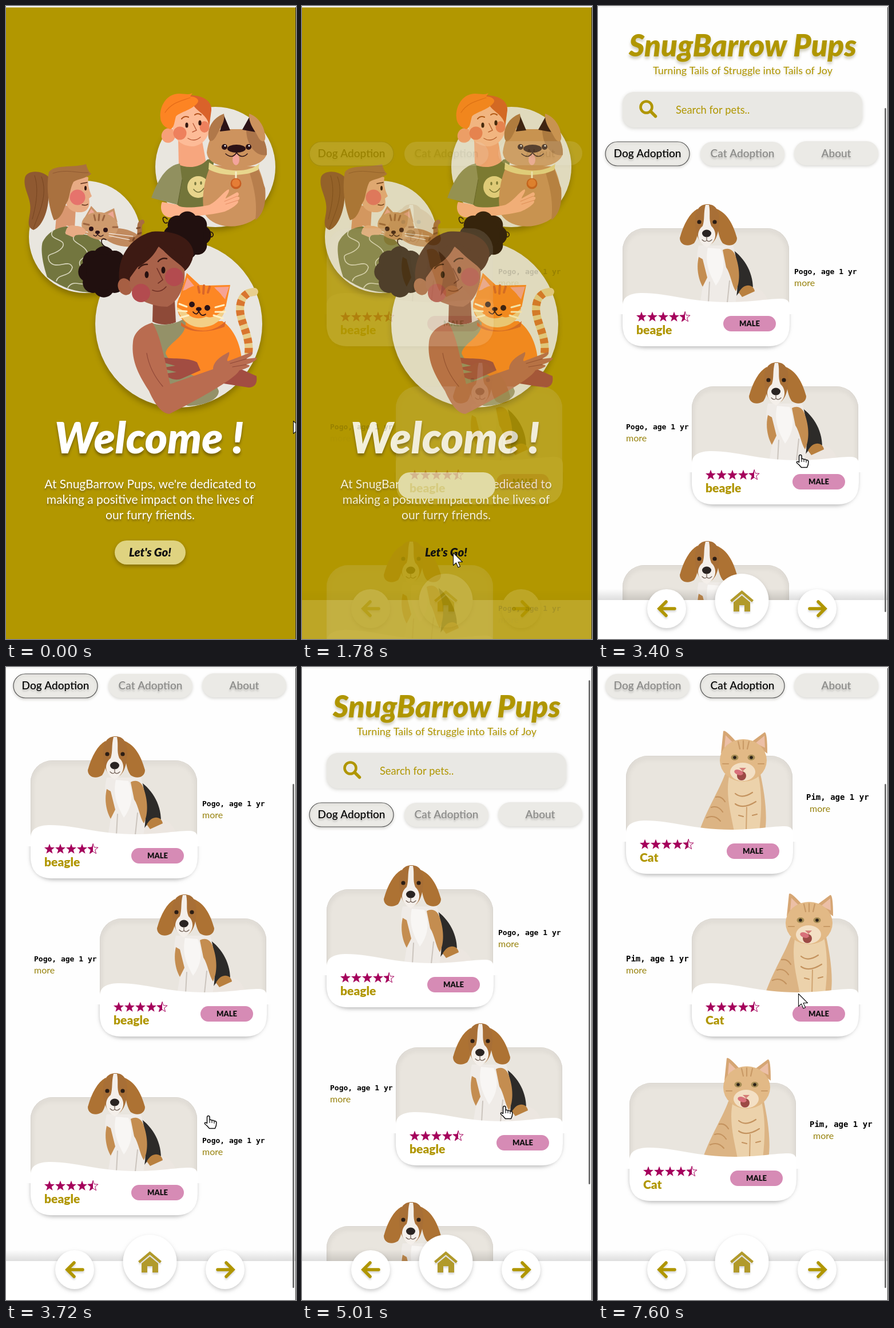
Animation of 507x1105 px, one loop 8000 ms. Source, as an HTML page with a canvas:

```html
<!DOCTYPE html>
<html lang="en">
<head>
<meta charset="utf-8">
<title>Pet adoption app</title>
<style>
html, body { margin: 0; width: 100%; height: 100%; overflow: hidden; background: #b29700; }
canvas { display: block; width: 507px; height: 1105px; }
</style>
</head>
<body>
<canvas id="stage"></canvas>
<script>
const W = 507, H = 1105, LOOP = 8000;
const OLIVE = '#b09600', BRAND = 'SnugBarrow Pups';
const dpr = window.devicePixelRatio || 1;

function setup(canvas) {
  canvas.width = W * dpr;
  canvas.height = H * dpr;
  const ctx = canvas.getContext('2d');
  ctx.scale(dpr, dpr);
  ctx.lineCap = 'round';
  return ctx;
}
let c = setup(document.getElementById('stage'));
const spare = setup(document.createElement('canvas'));

// ---- helpers ----
const lato = (size, style = '') => `${style} ${size}px Lato, "Open Sans", sans-serif`;
const brush = size => lato(size, 'italic 900');

function shadow(color = 'transparent', blur = 0, dy = 0) {
  c.shadowColor = color; c.shadowBlur = blur * dpr; c.shadowOffsetY = dy * dpr;
}
function path(d, fill, stroke, width = 1) {
  const p = new Path2D(d);
  if (fill) { c.fillStyle = fill; c.fill(p); }
  if (stroke) { c.strokeStyle = stroke; c.lineWidth = width; c.stroke(p); }
}
const line = (d, color, width = 1) => path(d, null, color, width);
function oval(x, y, rx, ry, fill, turn = 0) {
  c.beginPath(); c.ellipse(x, y, rx, ry, turn, 0, 7);
  c.fillStyle = fill; c.fill();
}
const disc = (x, y, r, fill) => oval(x, y, r, r, fill);
function box(x, y, w, h, r, fill, stroke) {
  c.beginPath(); c.roundRect(x, y, w, h, r);
  if (fill) { c.fillStyle = fill; c.fill(); }
  if (stroke) { c.strokeStyle = stroke; c.lineWidth = 1.2; c.stroke(); }
}
function text(s, x, y, font, fill, align = 'left') {
  c.font = font; c.fillStyle = fill; c.textAlign = align;
  c.fillText(s, x, y);
}
// Draws a group apart, then lays it down at one opacity.
function layer(alpha, draw) {
  const main = c;
  c = spare;
  c.clearRect(0, 0, W, H);
  draw();
  c = main;
  c.save();
  c.globalAlpha = alpha;
  c.drawImage(spare.canvas, 0, 0, W, H);
  c.restore();
}

// ---- welcome screen ----
function backCircle(x, y, r) {
  shadow('rgba(70,55,0,.4)', 10, 6);
  disc(x, y, r, '#e9e6df');
  shadow();
}

function boyAndDog() {
  backCircle(366, 281, 105);
  path('M322 156C345 156 360 166 359 182L355 212L330 190Z', '#d9622a');
  path('M301 232L343 236L350 274C335 288 312 284 302 277Z', '#f7a67e');
  oval(284, 226, 12, 13, '#f7a078', .5);
  path('M291 208C291 186 314 182 328 174C334 184 352 190 355 208C358 232 338 246 324 245C304 243 292 232 291 208Z', '#fdbb97');
  disc(304, 222, 11.5, '#ee805d');
  oval(347, 211, 8.5, 10, '#ee805d');
  path('M270 195C268 178 278 158 295 154C308 151 316 157 326 152L322 158C332 158 340 164 334 170C324 182 302 186 297 193C294 204 294 213 287 215C276 212 270 203 270 195Z', '#fd8423');
  line('M278 186C290 168 306 166 322 160', '#e56c18', 1.2);
  line('M307 197Q312 191 319 194M330 190Q335 186 341 190', '#b4531e', 2.2);
  oval(316, 208, 2.6, 4.6, '#33170f'); oval(339, 204, 2.6, 4.6, '#33170f');
  line('M327 205L333 217L326 220M318 231Q329 238 340 229', '#b85a38', 1.4);

  path('M300 276C318 285 340 282 352 268L364 266L352 362L298 352Z', '#73753a');
  path('M304 275C284 278 268 296 254 335L300 347L308 305Z', '#91905f');
  line('M308 303L300 347', '#5d5f2d');
  disc(336, 316, 19, '#e8d58c');
  line('M328 320Q337 331 346 318', '#77753d', 1.6);
  oval(331, 310, 1.7, 3, '#77753d'); oval(341, 309, 1.7, 3, '#77753d');

  path('M358 278C344 308 341 345 348 364C366 392 420 392 446 362C458 338 452 304 440 280Z', '#cd935e');
  path('M425 288C433 315 440 340 436 374C452 362 455 340 453 318L440 282Z', '#b77e4c');
  path('M351 256C353 236 362 216 378 215L430 215C444 218 457 240 456 258C450 277 425 281 405 281C380 281 354 278 351 256Z', '#cd935e');
  path('M420 215L430 215C446 218 457 240 456 260C440 264 420 246 420 215Z', '#ac754a');
  path('M381 191L392 217L374 219ZM427 191L413 216L436 220Z', '#2b1216');
  path('M354 230C352 212 362 195 381 188C384 201 375 212 368 226C363 236 356 240 354 230Z', '#b07849');
  path('M425 188C441 193 452 210 453 226C455 239 446 240 440 227C434 215 424 206 425 188Z', '#cd935e');
  path('M355 273C380 291 425 292 443 275L441 286C420 298 376 298 354 285Z', '#e8d68d');
  line('M402 290L402 303', '#f6edc8', 3);
  disc(402, 310, 9.5, '#c85d22'); disc(402, 309, 7, '#e57d36');
  oval(402, 268, 6, 10, '#f3a49c');
  line('M384 258Q396 268 403 256Q412 268 422 258', '#2b1216', 1.6);
  oval(403, 249, 16, 7, '#2b1216');
  for (const x of [382, 424]) { disc(x, 246, 5, '#2b1216'); disc(x + 1, 244, 1.5, '#fff'); }

  path('M273 342L300 347C302 354 340 352 356 347C370 340 380 324 389 320C393 322 384 333 384 336L404 325C409 327 407 331 404 333C411 332 408 338 405 340C410 343 395 354 382 359C360 365 320 368 285 369C270 366 269 350 273 342Z', '#fdb38c');
  line('M384 346L406 339M382 341L404 332', '#e68d65');
}

function girlAndKitten() {
  backCircle(138, 403, 98);
  path('M74 298C62 286 36 286 33 300C29 320 46 336 42 360C40 375 36 386 48 391C65 385 77 350 74 322Z', '#8f5931');
  line('M62 298C74 330 58 360 48 388M50 296C58 320 52 350 46 372', '#774521');
  path('M90 345L122 352L120 388L86 390Z', '#d99770');
  path('M116 305C128 300 140 297 144 299C142 314 147 325 150 332L145 336C148 350 142 361 128 360C112 360 104 350 104 335Z', '#e8ab84');
  path('M75 290C85 276 115 283 140 276C142 284 145 290 149 293C140 301 125 302 118 307C112 318 112 330 108 340C101 350 100 370 84 374C74 350 70 315 75 290Z', '#a9713f');
  line('M82 292C105 284 125 292 144 291', '#8f5931');
  disc(125, 334, 13.5, '#e6736c');
  oval(139, 318, 2, 4, '#33170f');
  line('M131 310L142 308M133 347Q140 349 143 346', '#5c2d18', 1.5);
  oval(203, 404, 34, 15, '#c18a5e', .2);
  line('M218 408C245 408 226 382 238 377', '#a86d42', 8);
  line('M222 409L224 405M231 398L236 396M229 388L234 387', '#7d4b2b', 3);
  path('M64 412C75 390 100 381 122 386C150 396 172 410 173 430C170 470 164 490 145 500C115 498 96 490 72 473C64 450 60 425 64 412Z', '#73763f');
  line('M82 392C70 410 110 405 98 422C84 438 68 428 76 446C88 462 110 440 116 456C112 474 92 466 88 480M122 398C108 412 132 414 140 426C150 440 122 438 130 454C142 466 156 450 160 464M108 492C118 474 136 494 146 480', '#d8d6bd', 1.6);
  path('M136 372L149 349L163 364ZM170 362L189 353L195 378Z', '#c99367');
  path('M141 368L149 354L158 364ZM176 364L187 358L190 374Z', '#eda796');
  oval(164, 384, 32, 24, '#ce9a6d', .15);
  line('M163 364L162 374M154 365L156 374M172 366L169 374M136 380L145 382M187 386L195 386', '#9c6540', 3);
  disc(149, 389, 4, '#2b1216'); disc(174, 391, 4, '#2b1216');
  oval(160, 395, 4, 3, '#2b1216');
  line('M153 400Q158 404 160 398Q164 405 170 400', '#2b1216', 1.3);
  line('M143 395L106 384M142 399L104 395M180 401L216 408M180 397L222 402', '#fff', 1.1);
  path('M104 398C104 386 112 380 122 384C134 384 144 392 138 398C134 402 122 396 118 404Z', '#e8ab84');
}

function puff(x, y, r) {
  for (let i = 0; i < 8; i++) {
    const a = i * Math.PI / 4;
    disc(x + Math.cos(a) * r * .62, y + Math.sin(a) * r * .62, r * .42, '#21100f');
  }
  disc(x, y, r * .72, '#21100f');
}

function girlAndCat() {
  backCircle(302, 555, 146);
  puff(171, 464, 43); puff(317, 400, 40);
  line('M282 372C270 360 274 384 282 378M350 396C365 388 366 408 354 402M176 422C162 414 166 402 175 408', '#21100f', 1.6);
  path('M198 480C194 440 215 405 255 394C290 391 325 402 328 432C326 448 318 460 310 464L220 486Z', '#3d1a13');
  path('M257 512L295 514L297 552C284 558 268 557 256 551Z', '#8e4a38');
  oval(208, 490, 12, 15, '#a75f43', -.4);
  path('M217 462C236 452 258 432 267 420C282 434 304 442 311 454C317 482 304 515 282 525C255 525 222 512 216 488Z', '#a9624a');
  disc(236, 501, 16, '#b34b4f'); disc(294, 473, 16, '#b34b4f');
  path('M214 478C214 446 240 420 268 414C264 432 246 448 230 456Z', '#3d1a13');
  path('M264 412C290 420 318 436 312 460C304 448 282 440 264 412Z', '#3d1a13');
  line('M232 458Q238 450 247 451M266 446Q272 439 281 441', '#3d1a13', 2.5);
  oval(246, 469, 3.5, 6, '#25100f'); oval(275, 461, 3.5, 6, '#25100f');
  line('M264 458L274 478L266 484M256 496Q270 502 280 490', '#6f3025', 1.6);

  path('M254 553C270 560 298 556 314 544L372 672C372 688 345 698 318 698L268 680Z', '#949168');
  line('M424 606C428 570 402 545 411 516C416 500 428 500 434 499', '#e8cf8e', 14);
  c.save();
  c.lineCap = 'butt'; c.setLineDash([9, 8]);
  line('M424 606C428 570 402 545 411 516C414 508 418 505 422 502', '#d9752f', 14);
  c.restore();
  path('M314 552C316 578 282 588 279 606C284 622 310 640 340 650L412 628C414 596 398 562 378 550Z', '#fd8724');
  path('M306 552C330 572 362 572 384 550L382 560C356 570 325 572 306 558Z', '#d9662a');
  path('M304 506L316 466L344 492ZM350 488L392 487L384 526Z', '#fd8724');
  path('M309 497L317 474L331 491ZM364 491L390 490L383 512Z', '#f6a394');
  oval(341, 524, 42, 37, '#fd8724');
  path('M299 526C304 546 320 561 341 561C365 560 379 548 383 528C368 542 358 546 350 542C338 548 324 546 314 534Z', '#f3cf86');
  line('M303 520L316 525M301 532L316 533M304 544L319 540M381 522L366 526M383 534L366 534M379 545L363 540', '#fff0c4', 3);
  line('M346 488L345 502M336 490L338 500M356 490L353 500', '#d9662a', 4);
  disc(325, 521, 5, '#2b1216'); disc(352, 527, 5, '#2b1216');
  oval(337, 529, 5, 3.5, '#2b1216');
  line('M327 534Q334 542 337 532Q341 544 349 538', '#2b1216', 1.8);

  path('M268 612C290 618 316 612 334 622L340 636L308 650C295 656 280 648 278 642L298 639L270 632L296 628L266 620Z', '#a24d42');
  path('M374 638L402 630L438 646C440 660 434 666 424 666L374 658Z', '#a24d42');
  path('M222 586C224 568 240 557 256 553C270 574 278 620 287 660L362 634C362 618 382 608 390 604C392 610 384 618 388 620L430 604C434 608 424 613 420 616L438 614C440 619 426 624 420 626C432 627 424 632 408 636C400 652 330 690 286 712C270 712 258 690 250 672C235 648 218 622 222 586Z', '#b96c50');
  line('M392 624L420 616M396 630L420 626M246 606C250 630 262 650 274 664', '#904838', 1.2);
}

function welcome(button) {
  boyAndDog();
  girlAndKitten();
  girlAndCat();
  shadow('rgba(60,45,0,.5)', 4, 4);
  text('Welcome !', 250, 781, brush(75), '#fff', 'center');
  shadow('rgba(60,45,0,.4)', 3, 3);
  [`At ${BRAND}, we're dedicated to`, 'making a positive impact on the lives of', 'our furry friends.']
    .forEach((s, i) => text(s, 252, 842 + i * 27, lato(21), '#fff', 'center'));
  if (button) {
    shadow('rgba(60,45,0,.4)', 6, 3);
    box(190, 933, 124, 42, 21, '#dfd380');
  }
  shadow();
}
const goLabel = () => text("Let's Go!", 252, 961, brush(20.5), '#111', 'center');

// ---- home screen ----
function beagle() {
  path('M230 422C254 436 272 464 271 496L290 520L235 520Z', '#2d2b29');
  path('M242 506C258 482 292 486 298 520L235 520Z', '#ece6e0');
  path('M246 500C256 482 272 486 274 498L252 508Z', '#b9803f');
  path('M176 418C168 450 180 470 183 490L178 520L240 520C246 490 246 450 236 418Z', '#efebe7');
  path('M218 426C228 420 238 426 241 438C250 465 247 486 241 498C234 488 232 468 224 456Z', '#c48d50');
  path('M176 438C171 460 177 480 183 490L191 474L183 442Z', '#c48d50');
  path('M192 422C186 450 196 470 206 488C220 470 224 446 214 424Z', '#f8f6f4');
  line('M195 482L193 518M230 480L226 518', '#cbc4bd', 2);
  path('M174 354C160 362 150 380 143 405C143 418 158 421 168 414C178 400 174 380 177 360ZM207 354C226 362 236 380 243 405C243 418 228 421 218 414C208 400 210 380 204 360Z', '#ad7233');
  path('M170 376C169 354 180 346 191 346C204 346 212 354 212 376C211 400 204 417 190 418C177 416 170 400 170 376Z', '#a86f36');
  path('M188 347C184 362 187 372 183 384C171 394 172 412 190 421C208 412 209 394 198 384C193 372 197 362 194 347Z', '#f4efea');
  disc(177, 377, 3.6, '#2b1d14'); disc(204, 377, 3.6, '#2b1d14');
  oval(190, 397, 8, 6.5, '#2a2422');
  line('M190 403L190 409M182 408Q187 413 190 409Q194 413 199 408', '#6b5a50', 1.2);
}

function kitten() {
  path('M222 412C212 440 192 470 177 512L292 512C297 480 290 440 284 412Z', '#dcb484');
  path('M230 412C222 445 232 480 238 512L282 512C287 470 286 440 280 412Z', '#ecd2ab');
  line('M206 452Q216 450 222 460M198 470Q210 466 218 478M190 488Q204 482 214 494M240 446Q252 456 270 444M240 464Q254 474 276 460M246 484L254 486M270 484L278 482', '#c4935f', 2.2);
  line('M260 470L259 512', '#cfa371', 2);
  path('M215 376L219 337Q222 333 244 358ZM268 356L291 339Q296 338 296 376Z', '#d6a674');
  path('M221 366L223 344L237 358ZM275 358L291 345L292 366Z', '#ecbfa6');
  oval(254, 388, 41, 37, '#e2b986');
  line('M254 354L254 368M245 355L248 368M264 355L261 368M218 394L228 394M290 394L280 394', '#c99a66', 2.2);
  oval(253, 408, 22, 16, '#f3dfc4');
  for (const x of [239, 268]) { oval(x, 383, 6.5, 5, '#a58c55'); disc(x, 383, 2.8, '#2a2118'); }
  oval(251, 415, 8, 8, '#9c4a45');
  oval(246, 409, 8, 4.5, '#d8707a', .3);
  path('M247 401L259 401L253 407Z', '#d57f78');
}

function star(x, y, half) {
  const trace = () => {
    c.beginPath();
    for (let i = 0; i < 10; i++) {
      const a = i * Math.PI / 5 - Math.PI / 2, r = i % 2 ? 3.9 : 9.5;
      c.lineTo(x + r * Math.cos(a), y + r * Math.sin(a));
    }
    c.closePath();
  };
  trace();
  c.fillStyle = c.strokeStyle = '#a5005c';
  if (!half) return c.fill();
  c.lineWidth = 1; c.stroke();
  c.save();
  c.beginPath(); c.rect(x - 10, y - 10, 10, 20); c.clip();
  trace(); c.fill();
  c.restore();
}

const DOGS = { pet: beagle, home: [43, 388], breed: 'beagle', name: 'Pogo, age 1 yr', size: 13, dx: 300, dy: 80, more: 300,
  cards: [[43, 388], [164, 664], [43, 976]] };
const CATS = { pet: kitten, home: [49, 380], breed: 'Cat', name: 'Pim, age 1 yr', size: 14, dx: 315, dy: 77, more: 321,
  cards: [[49, 380], [164, 664], [55, 951]] };

function card(kind, x, y, middle) {
  c.save();
  c.translate(x, y);
  c.save();
  box(0, 0, 291, 180, 38, '#e9e5de'); c.clip();
  shadow('rgba(0,0,0,.35)', 9, 3);
  box(0, 0, 291, 230, 38, null, '#d0ccc5');
  c.restore();
  c.save();
  c.beginPath(); c.rect(0, 150, 291, 80); c.rect(-20, 150, 340, 80); c.clip();
  shadow('rgba(0,0,0,.25)', 6, 3);
  box(0, 60, 291, 146, 38, '#fff');
  c.restore();
  c.save();
  c.beginPath(); c.rect(-20, -70, 340, 200); c.clip();
  c.translate(-kind.home[0], -kind.home[1]);
  kind.pet();
  c.restore();
  path('M0 135C0 118 15 113 35 113C80 113 120 130 190 129C230 128 255 123 278 123C288 123 292 128 292 136L292 168Q292 206 254 206L38 206Q0 206 0 168Z', '#fff');
  for (let i = 0; i < 5; i++) star(33 + i * 19, 155, i === 4);
  text(kind.breed, 24, 185, lato(21, '900'), OLIVE);
  box(176, 153, 92, 27, 13.5, '#d68bb5');
  text('MALE', 222, 171, lato(13, '900'), '#111', 'center');
  const nx = middle ? 49 - x : kind.dx, ny = middle ? 75 : kind.dy;
  text(kind.name, nx, ny, `bold ${kind.size}px "DejaVu Sans Mono", "Noto Sans Mono", monospace`, '#000');
  text('more', middle ? nx : kind.more, ny + 21, lato(16), '#97820c');
  c.restore();
}

function tab(label, x, y, on) {
  shadow('rgba(120,115,100,.28)', 5, 2);
  box(x, y, 147, 42, 21, '#ebeae6', on && '#555');
  shadow('rgba(0,0,0,.2)', 3, 3);
  text(label, x + 73.5, 264, lato(19, '500'), on ? '#000' : '#8a8a88', 'center');
  shadow();
}

function petList(kind) {
  tab('Dog Adoption', 13, 237, kind === DOGS);
  tab('Cat Adoption', 179, 237, kind === CATS);
  tab('About', 343, 236, false);
  kind.cards.forEach(([x, y], i) => card(kind, x, y, i === 1));
}

function header() {
  shadow('rgba(90,80,20,.3)', 5, 4);
  text(BRAND, 253, 88, brush(52.5), OLIVE, 'center');
  shadow('rgba(90,80,20,.2)', 3, 3);
  text('Turning Tails of Struggle into Tails of Joy', 253, 119, lato(18), OLIVE, 'center');
  shadow('rgba(120,115,100,.3)', 6, 2);
  box(43, 150, 419, 62, 20, '#e9e8e4');
  shadow();
  c.beginPath(); c.arc(84.5, 176.5, 10, 0, 7);
  c.strokeStyle = OLIVE; c.lineWidth = 4.6; c.stroke();
  line('M92 184L100.5 192.5', OLIVE, 5.5);
  text('Search for pets..', 136, 188, lato(18.3), OLIVE);
}

function nav() {
  const g = c.createLinearGradient(0, 1017, 0, 1037);
  g.addColorStop(0, 'rgba(0,0,0,0)');
  g.addColorStop(1, 'rgba(0,0,0,.13)');
  c.fillStyle = g; c.fillRect(0, 1017, W, 20);
  c.fillStyle = '#fff'; c.fillRect(0, 1037, W, 68);
  shadow('rgba(0,0,0,.2)', 6, 3);
  disc(120, 1052, 34, '#fff'); disc(383, 1052, 34, '#fff'); disc(251.5, 1038, 47, '#fff');
  shadow('rgba(0,0,0,.15)', 3, 3);
  line('M134 1052L108 1052M119 1040L107 1052L119 1064', OLIVE, 5.5);
  line('M370 1052L396 1052M385 1040L397 1052L385 1064', OLIVE, 5.5);
  c.lineCap = 'butt';
  line('M232.5 1039L251.5 1023L270.5 1039', '#b19a2b', 4.5);
  path('M237 1041L251.5 1029L266 1041L266 1057L256 1057L256 1046L247 1046L247 1057L237 1057Z', '#b19a2b');
  c.lineCap = 'round';
  shadow();
}

// ---- cursor ----
function pointer(kind, x, y) {
  if (!kind) return;
  c.save();
  c.translate(x + .5, y + .5);
  c.lineJoin = 'round';
  if (kind === 'arrow') {
    path('M0 0L0 22L5 17.5L8.5 25.5L12 24L8.5 16L16 16Z', '#fff', '#111', 1.1);
  } else {
    path('M5 13L5 3Q5 0 7.3 0Q9.6 0 9.6 3L9.6 7Q12 6 13.5 8Q16 7 17.5 9Q21 8.5 21.5 12Q21.5 17 19 22L9 22Q5 17 1 14Q0 10 5 13Z', '#fff', '#111', 1.5);
    line('M9.6 7L9.6 12M13.5 8L13.5 12M17.5 9L17.5 13', '#111', 1.2);
  }
  c.restore();
}

// ---- timeline: each row holds until the next ----
const CURSOR = [
  [0, 'arrow', 502, 724], [500, 'arrow', 162, 1032], [660], [820, 'arrow', 213, 1020],
  [960, 'arrow', 243, 984], [1090, 'arrow', 264, 954], [2080], [2380, 'hand', 258, 954],
  [2890, 'hand', 300, 880], [2970, 'hand', 346, 778], [3170, 'hand', 346, 780], [3400, 'hand', 346, 783],
  [5010, 'hand', 346, 766], [5160, 'hand', 353, 653], [5300, 'arrow', 282, 400], [5430, 'arrow', 201, 128],
  [5580, 'hand', 231, 265], [5700, 'hand', 227, 260], [5940, 'hand', 226, 252], [6240, 'hand', 232, 258],
  [6330, 'hand', 238, 263], [6540, 'arrow', 363, 500], [6960, 'arrow', 371, 587], [7040], [7600, 'arrow', 350, 570]
];
// time, page offset, scrollbar top
const SCROLL = [
  [0, 0, 23], [3400, 0, 178], [3530, 193, 204], [3720, 225, 204],
  [4380, 163, 140], [4460, 60, 58], [4590, 0, 23], [7040, 225, 204]
];
const SCENE = [[0, 'welcome'], [1780, 'leaving'], [2080, 'dogs'], [6240, 'swap'], [6330, 'cats']];
const at = (rows, t) => rows.findLast(r => r[0] <= t);

function draw([, scene], [, offset, bar], [, kind, x, y]) {
  const intro = scene === 'welcome' || scene === 'leaving';
  shadow();
  c.fillStyle = intro ? '#b29700' : '#fefefe';
  c.fillRect(0, 0, W, H);
  if (scene === 'welcome') {
    welcome(true);
    goLabel();
  } else if (scene === 'leaving') {
    layer(.85, () => welcome(false));
    box(168, 814, 170, 46, 21, '#ddd596');
    layer(.14, () => petList(DOGS));
    layer(.15, nav);
    goLabel();
  } else {
    c.save();
    c.translate(0, -offset);
    header();
    petList(scene === 'cats' ? CATS : DOGS);
    if (scene === 'swap') {
      layer(.5, () => {
        c.fillStyle = '#fefefe'; c.fillRect(0, 225, W, 880);
        petList(CATS);
      });
    }
    c.restore();
    nav();
    box(501, bar, 3, 880, 1.5, '#747474');
  }
  pointer(kind, x, y);
  c.fillStyle = '#f4f4f4'; c.fillRect(0, 0, W, 2.5);
  c.fillStyle = '#3a3a3a'; c.fillRect(506, 2, 1, H);
}

let shown = [];
function tick() {
  const t = performance.now() % LOOP;
  const state = [SCENE, SCROLL, CURSOR].map(rows => at(rows, t));
  if (state.some((row, i) => row !== shown[i])) {
    draw(...state);
    shown = state;
  }
  requestAnimationFrame(tick);
}
tick();
</script>
</body>
</html>
```
